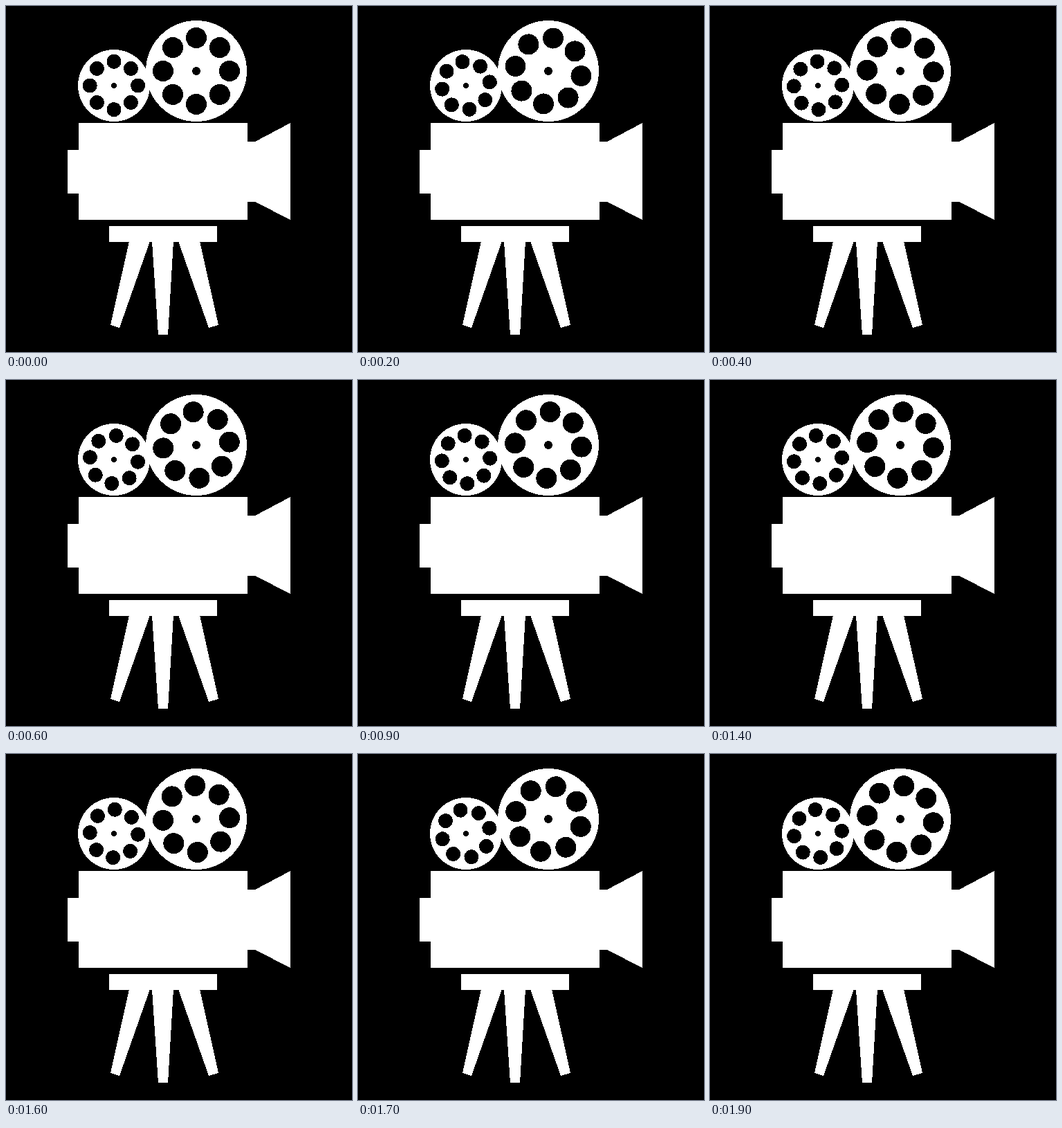
Animation of 500 by 500 pixels, one loop 2000 ms. Source, as an HTML page:

```html
<!DOCTYPE html>
<html lang="en">
<head>
<meta charset="utf-8">
<title>Film camera</title>
<style>
  html, body { margin: 0; width: 100%; height: 100%; overflow: hidden; background: #000; }
  svg { display: block; width: 100vw; height: 100vh; }
</style>
</head>
<body>
<svg viewBox="0 0 500 500" fill="#fff" shape-rendering="crispEdges">
  <g id="reels"></g>
  <path d="M105 169H349V309H105Z M89 208H106V271H89Z"/>
  <path d="M348 196H360L411 169V309L360 283H348Z"/>
  <path d="M149 318H305V341H149Z"/>
  <path d="M178 340H208L164 465L151 461Z M211 340H242L234 475H220Z M249 340H280L307 461L293 465Z"/>
</svg>
<script>
const LOOP = 2000;
const STEP = 100;
const FILM_FRAMES_PER_STEP = 2.4;
const DEGREES_PER_FILM_FRAME = 7.63;

const reelLayer = document.getElementById('reels');

function add(parent, tag, attrs) {
  const node = document.createElementNS('http://www.w3.org/2000/svg', tag);
  for (const name in attrs) node.setAttribute(name, attrs[name]);
  return parent.appendChild(node);
}

function makeReel({ x, y, radius, orbit, hole, hub, direction }) {
  const reel = add(reelLayer, 'g', { transform: `translate(${x} ${y})` });
  add(reel, 'circle', { r: radius });
  const holes = add(reel, 'g', { fill: '#000' });
  add(holes, 'circle', { r: hub });
  for (let i = 0; i < 8; i++) {
    const a = i * Math.PI / 4;
    add(holes, 'circle', { cx: orbit * Math.cos(a), cy: orbit * Math.sin(a), r: hole });
  }
  return { holes, direction };
}

const reels = [
  makeReel({ x: 156, y: 115, radius: 52, orbit: 34.7, hole: 10.5, hub: 4, direction: -1 }),
  makeReel({ x: 275, y: 94, radius: 73, orbit: 48, hole: 15, hub: 6, direction: 1 })
];

// The reels start at rest, then skip one step and run on at film speed.
function angleAt(time) {
  const step = Math.floor(time % LOOP / STEP);
  const filmFrame = step ? Math.round((step + 1) * FILM_FRAMES_PER_STEP) : 0;
  return filmFrame * DEGREES_PER_FILM_FRAME;
}

function draw(time) {
  const angle = angleAt(time);
  for (const { holes, direction } of reels) {
    holes.setAttribute('transform', `rotate(${direction * angle})`);
  }
}

const start = performance.now();
function tick() {
  draw(performance.now() - start);
  requestAnimationFrame(tick);
}
tick();
</script>
</body>
</html>
```
